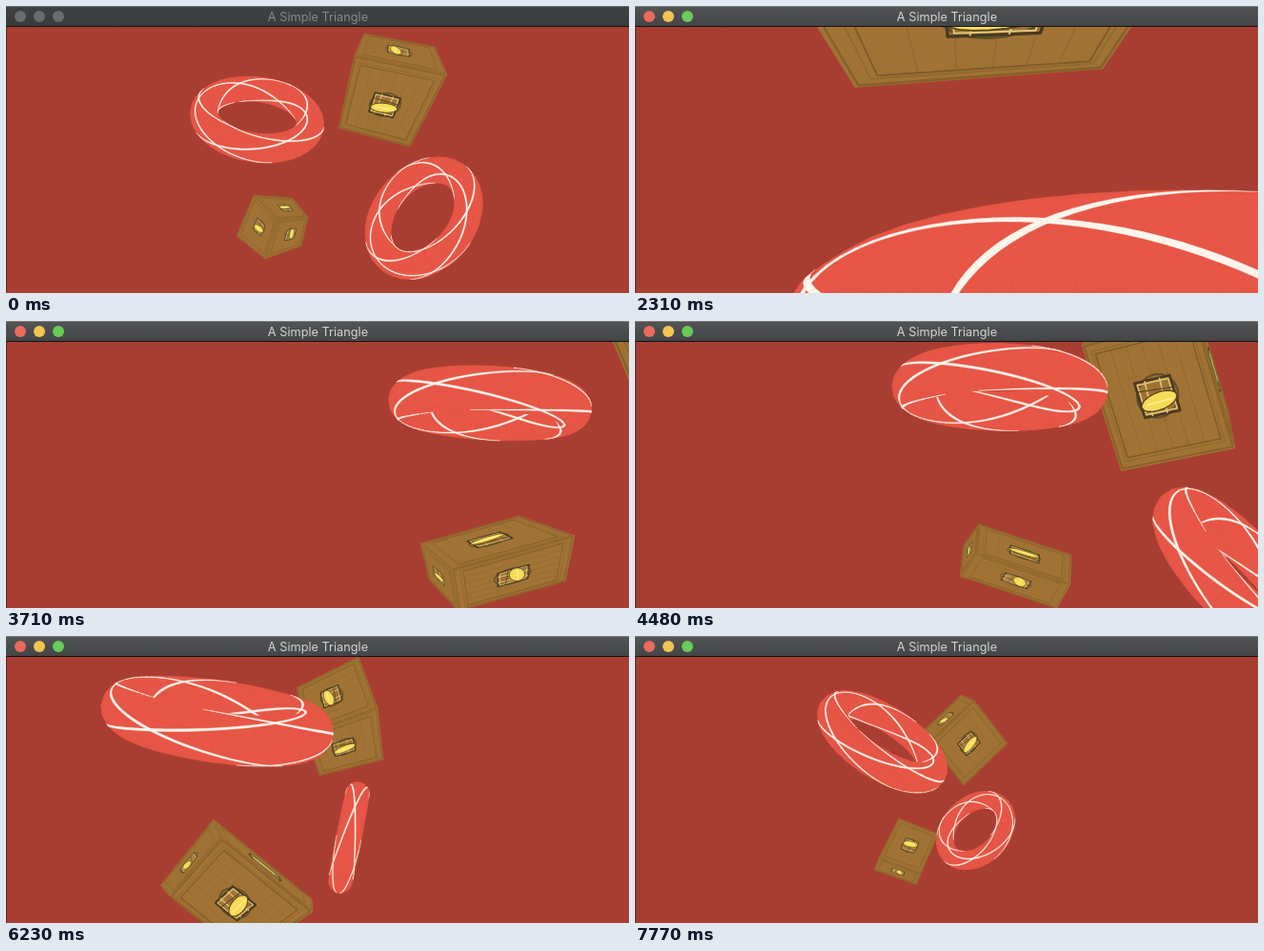
Recreate the animation shown at these times as an HTML page with a canvas. Size 654 px wide and 302 px high, loop 7.84 s.

```html
<!DOCTYPE html>
<html lang="en">
<head>
<meta charset="utf-8">
<title>A Simple Triangle</title>
<style>
  html, body { margin: 0; width: 100%; height: 100%; overflow: hidden; background: #a83e32; }
  canvas { display: block; }
</style>
</head>
<body>
<canvas id="stage" width="654" height="302"></canvas>
<script>
const g = document.getElementById('stage').getContext('2d');
const LOOP = 7840, STEP = 70, TAU = Math.PI * 2, RAD = Math.PI / 180;
const TIMES = [0, 1470, 2310, 3710, 5040, 6230, 7770];

// Torus poses: centre x, y, outer radius, tilt, roll (degrees)
const torusA = [
  [264, 116, 70, 57, 8], [244, 101, 90, 68, 29], [-330, 40, 190, 85, 20],
  [508, 90, 106, 102, 3], [292, 62, 117, 107, 0], [222, 86, 122, 79, 8],
  [261, 109, 76, 68, 33]];
const torusB = [
  [436, 221, 70, 44, -50], [459, 224, 89, 39, 10], [575, 366, 435, 73, 0],
  [930, 330, 180, 75, 30], [425, 221, 72, 74, 58], [360, 212, 59, 90, 101],
  [356, 203, 46, 135, 135]];

// Crate poses: one corner x, y, then its three neighbours as x, y, depth weight
const crateA = [
  [463, 72, 366, 52, 1.07, 424, 148, 1.28, 450, 43, 1.32],
  [433, 58, 340, 42, 1.35, 430, 149, 1.38, 494, 21, 1.33],
  [611, -110, 79, -160, .65, 491, 66, 1.84, 560, -200, 1.5],
  [800, -40, 630, 5, 1, 880, 150, 1, 760, -90, 1],
  [436, 20, 352, 40, 1.08, 448, 122, 1.04, 464, 27, 1.3],
  [390, 76, 314, 104, 1.19, 396, 130, 1.18, 370, 22, 1.15],
  [356, 68, 310, 112, 1, 391, 113, 1, 342, 62, 1]];
const crateB = [
  [285, 225, 260, 199, .9, 272, 266, .9, 317, 222, 1.3],
  [297, 230, 231, 210, 1.31, 286, 291, .91, 334, 233, 1.1],
  [-200, 400, -190, 450, 1.1, -60, 360, 1, -240, 370, 1.2],
  [468, 262, 475, 305, 1.15, 597, 226, 1, 435, 234, 1.25],
  [278, 232, 244, 242, .85, 355, 315, 1, 307, 199, .85],
  [226, 212, 172, 274, 1.2, 322, 290, 1, 218, 193, .93],
  [256, 234, 251, 246, 1, 300, 250, 1.03, 277, 192, 1.05]];

function pose(keys, t) {
  let i = 0;
  while (i < 5 && t >= TIMES[i + 1]) i++;
  let p = (t - TIMES[i]) / (TIMES[i + 1] - TIMES[i]);
  if (i === 5) p = 1 - (1 - p) ** 2;   // the camera settles at the end
  return keys[i].map((a, n) => a + (keys[i + 1][n] - a) * p);
}

function trace(points, closed = true) {
  g.beginPath();
  points.forEach(([x, y]) => g.lineTo(x, y));
  if (closed) g.closePath();
}

function fill(points, color, seam) {
  trace(points);
  g.fillStyle = g.strokeStyle = color;
  g.fill();
  if (seam) { g.lineWidth = seam; g.stroke(); }
}

function stroke(points, color, width, closed) {
  trace(points, closed);
  g.strokeStyle = color;
  g.lineWidth = width;
  g.stroke();
}

const cross = (o, a, b) => (a[0] - o[0]) * (b[1] - o[1]) - (a[1] - o[1]) * (b[0] - o[0]);

function torus([cx, cy, size, tilt, roll]) {
  const R = .8, r = .2, depth = .12;
  const ct = Math.cos(tilt * RAD), st = Math.sin(tilt * RAD);
  const cr = Math.cos(roll * RAD), sr = Math.sin(roll * RAD);
  const polys = [];

  function project([u, v]) {
    const ring = R + r * Math.cos(v), h = r * Math.sin(v);
    const x = ring * Math.cos(u), y0 = ring * Math.sin(u);
    const y = y0 * ct - h * st, z = y0 * st + h * ct;
    const s = size / (1 - depth * z);
    return [cx + s * (x * cr - y * sr), cy + s * (x * sr + y * cr), z];
  }
  function add(corners, color, seam, lift) {
    const pts = corners.map(project);
    if (cross(pts[0], pts[1], pts[2]) + cross(pts[0], pts[2], pts[3]) <= 0) return;
    polys.push({ pts, color, seam, z: pts.reduce((sum, p) => sum + p[2], 0) / 4 + lift });
  }

  const M = 40, N = 16;
  for (let i = 0; i < M; i++) for (let j = 0; j < N; j++) {
    const u = i / M * TAU, v = j / N * TAU, du = TAU / M, dv = TAU / N;
    add([[u, v], [u + du, v], [u + du, v + dv], [u, v + dv]], '#e75646', .7, 0);
  }
  // Three bands winding each way round the tube
  const L = 80, half = .05;
  for (const dir of [1, -1]) for (let k = 0; k < 3; k++) for (let i = 0; i < L; i++) {
    const u = i / L * TAU, w = (i + 1) / L * TAU;
    const a = dir * u + k * TAU / 3, b = dir * w + k * TAU / 3;
    add([[u, a - half], [w, b - half], [w, b + half], [u, a + half]], '#fff5ec', .35, .1);
  }
  polys.sort((a, b) => a.z - b.z).forEach(p => fill(p.pts, p.color, p.seam));
}

function face(at) {
  const o = at(0, 0), a = at(1, 0), b = at(0, 1);
  if (cross(o, a, b) >= 0) return;
  const side = Math.sqrt(Math.abs(cross(o, a, b)));
  const lw = Math.min(2, Math.max(.5, side / 90));
  const rect = (x0, y0, x1, y1) => [at(x0, y0), at(x1, y0), at(x1, y1), at(x0, y1)];
  const oval = (x, y, rx, ry, skew) => Array.from({ length: 18 }, (_, i) => {
    const c = Math.cos(i / 18 * TAU), s = Math.sin(i / 18 * TAU);
    return at(x + rx * c, y + ry * s + skew * c);
  });
  const line = (x0, y0, x1, y1, color, width) =>
    stroke([at(x0, y0), at(x1, y1)], color, width, false);

  fill(rect(0, 0, 1, 1), '#a07335', .6);
  for (let i = 1; i < 6; i++) line(.09 + i * .137, .09, .09 + i * .137, .91, '#97692e', lw * .8);
  stroke(rect(.015, .015, .985, .985), '#876029', lw * 1.2);
  stroke(rect(.065, .065, .935, .935), '#8f672e', lw * .7);
  stroke(rect(.09, .09, .91, .91), '#815b28', lw);

  // Emblem: a scratchy little frame with a yellow shape across it
  stroke(oval(.5, .5, .18, .16, .02), '#62502a', lw * 1.5);
  stroke(rect(.35, .37, .66, .64), '#493a20', lw * 1.7);
  stroke(rect(.37, .39, .64, .62), '#e3c87a', lw);
  for (const x of [.44, .57]) line(x, .37, x + .02, .64, '#e3c87a', lw);
  line(.36, .46, .65, .44, '#5b4725', lw);
  fill(oval(.5, .54, .16, .065, .02), '#f6dc57');
  stroke(oval(.5, .54, .16, .065, .02), '#57451f', lw * .9);
  line(.38, .54, .61, .55, '#fff4a0', lw);
}

function crate([ox, oy, ...n]) {
  const e = [0, 3, 6].map(i => [n[i] * n[i + 2] - ox, n[i + 1] * n[i + 2] - oy, n[i + 2] - 1]);
  for (const [i, j] of [[0, 1], [1, 2], [2, 0]]) {
    face((s, t) => {
      const mix = k => s * e[i][k] + t * e[j][k];
      const w = 1 + mix(2);
      return [(ox + mix(0)) / w, (oy + mix(1)) / w];
    });
  }
}

function titleBar(active) {
  const shade = g.createLinearGradient(0, 0, 0, 21);
  shade.addColorStop(0, active ? '#535456' : '#3e4042');
  shade.addColorStop(1, active ? '#434547' : '#393b3d');
  g.fillStyle = shade;
  g.fillRect(0, 0, 654, 21);
  g.fillStyle = active ? '#77797a' : '#616365';
  g.fillRect(0, 0, 654, 1);
  g.fillStyle = '#171313';
  g.fillRect(0, 21, 654, 1);
  const lights = active ? ['#eb6a5c', '#f4c452', '#69cb59'] : Array(3).fill('#6a6c6e');
  lights.forEach((color, i) => {
    g.fillStyle = color;
    g.beginPath();
    g.arc(15 + 20 * i, 11, 6, 0, TAU);
    g.fill();
  });
  g.font = '12.75px Inter, Roboto, sans-serif';
  g.textAlign = 'center';
  g.fillStyle = active ? '#d2d3d3' : '#87898b';
  g.fillText('A Simple Triangle', 327.5, 16);
}

const start = performance.now();
function draw() {
  const t = Math.floor((performance.now() - start) % LOOP / STEP) * STEP;
  g.lineJoin = 'round';
  g.fillStyle = '#a83e32';
  g.fillRect(0, 0, 654, 302);
  crate(pose(crateA, t));
  crate(pose(crateB, t));
  torus(pose(torusA, t));
  torus(pose(torusB, t));
  g.fillStyle = '#5b2822';
  g.fillRect(0, 22, 1, 280);
  titleBar(t >= 980);
  requestAnimationFrame(draw);
}
draw();
</script>
</body>
</html>
```
